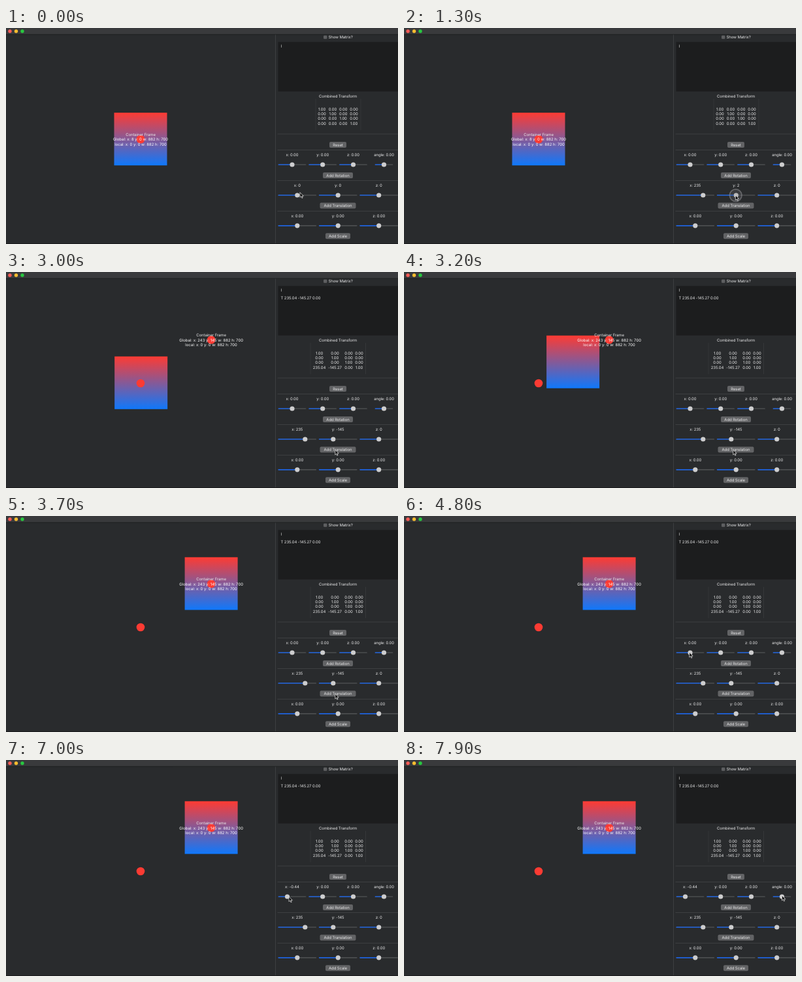
Recreate the animation shown at these times as an HTML page. Size 600x332 px, loop 8 s.

```html
<!DOCTYPE html>
<html lang="en">
<head>
<meta charset="utf-8">
<title>Transform playground</title>
<style>
  html, body { margin: 0; width: 100%; height: 100%; overflow: hidden; background: #292b2d; }
  svg { display: block; width: 600px; height: 332px; }
  text {
    font: 6px Inter, Roboto, "Liberation Sans", sans-serif;
    letter-spacing: -.1px;
    fill: #e9e9ea;
    text-anchor: middle;
    text-rendering: geometricPrecision;
    white-space: pre;
  }
  .left { text-anchor: start; }
  .wide { letter-spacing: -.02px; fill: #fff; }
  .rule { stroke: #3d3f41; stroke-width: 1; }
  .track { stroke: #4b4d4f; stroke-width: 1.7; stroke-linecap: round; }
  .fill { stroke: #1c60dc; stroke-width: 1.7; stroke-linecap: round; }
  .knob { fill: #cdcdce; }
  .button { fill: #626365; }
  .dot { fill: #fc3b33; }
</style>
</head>
<body>
<svg id="stage" viewBox="0 0 600 332">
  <defs>
    <linearGradient id="sky" x1="0" y1="0" x2="0" y2="1">
      <stop offset="0" stop-color="#fd3b33"/>
      <stop offset="1" stop-color="#0f78fb"/>
    </linearGradient>
  </defs>
  <rect width="600" height="332" fill="#292b2d"/>
  <rect width="600" height="10" fill="#393a3c"/>
  <rect y="9.5" width="600" height="1" fill="#1d1e1f"/>
  <rect y="331" width="600" height="1" fill="#1b1c1d"/>
  <circle cx="6" cy="5" r="2.7" fill="#fc5b56"/>
  <circle cx="15.5" cy="5" r="2.7" fill="#fdbd2f"/>
  <circle cx="25" cy="5" r="2.7" fill="#28c840"/>
  <path class="rule" d="M412.5 10.5V331"/>

  <rect id="square" x="165.5" y="130.2" width="81" height="81" fill="url(#sky)"/>
  <circle class="dot" cx="206" cy="171" r="6.3"/>
  <g id="label">
    <circle class="dot" cx="206" cy="171" r="6.3"/>
    <text x="206" y="166">Container Frame</text>
    <text id="global" class="wide" x="206" y="173.4"></text>
    <text class="wide" x="206" y="180.7">local: x: 0 y: 0 w: 882 h: 700</text>
  </g>

  <rect x="486" y="11.4" width="5.4" height="5.4" rx="1.2" fill="#5e5f61"/>
  <text class="left" x="493.5" y="16.3">Show Matrix?</text>
  <rect x="416.5" y="21.5" width="183.5" height="76" fill="#1c1d1e"/>
  <text class="left" x="420.5" y="29.7">I</text>
  <text id="step" class="left" x="420.5" y="41.7">T 235.04 -145.27 0.00</text>
  <text x="508" y="106.6">Combined Transform</text>
  <g id="panel"></g>

  <circle id="ring" r="9.3" fill="#77787a" fill-opacity=".22" stroke="#9a9a9e" stroke-opacity=".5" stroke-width="1.7"/>
  <path id="cursor" d="M0 0V7.6L1.8 6L3 8.8L4.2 8.3L3 5.6H5.4Z" fill="#0a0a0a" stroke="#f4f4f4" stroke-width=".7" stroke-linejoin="round"/>
</svg>
<script>
const LOOP = 8000;
const SCALE = 0.46;
const MOVE = { x: 235.04, y: -145.27 };
const APPLY = 2980, GLIDE = 450;

const $ = id => document.getElementById(id);
const panel = $('panel');

function add(parent, tag, attrs, text) {
  const el = document.createElementNS('http://www.w3.org/2000/svg', tag);
  for (const key in attrs) el.setAttribute(key, attrs[key]);
  if (text !== undefined) el.textContent = text;
  parent.append(el);
  return el;
}

const ease = u => u * u * (3 - 2 * u);

// Eased value along keys of [time, value]
function along(keys, t) {
  const next = keys.findIndex(k => k[0] > t);
  if (next === 0) return keys[0][1];
  if (next < 0) return keys[keys.length - 1][1];
  const [t0, a] = keys[next - 1], [t1, b] = keys[next];
  return a + (b - a) * ease((t - t0) / (t1 - t0));
}

for (const y of [163, 187.5, 234.5, 281.5]) {
  add(panel, 'path', { class: 'rule', d: `M415.5 ${y}H600` });
}

function button(label, y, width) {
  add(panel, 'rect', { class: 'button', x: 508 - width / 2, y: y - 4.5, width, height: 9, rx: 2 });
  add(panel, 'text', { x: 508, y: y + 2.1 }, label);
}
button('Reset', 179.5, 26);
button('Add Rotation', 226.5, 46);
button('Add Translation', 273, 55);
button('Add Scale', 319.7, 38);

function slider(name, x, y, half, perUnit, digits) {
  add(panel, 'path', { class: 'track', d: `M${x - half} ${y}H${x + half}` });
  const fill = add(panel, 'path', { class: 'fill' });
  const knob = add(panel, 'circle', { class: 'knob', cy: y, r: 3.6 });
  const label = add(panel, 'text', { x, y: y - 12.9 });
  const set = value => {
    const at = x + value * perUnit;
    const shown = value.toFixed(digits).replace(/^-(0(\.0+)?)$/, '$1');
    fill.setAttribute('d', `M${x - half} ${y}H${at}`);
    knob.setAttribute('cx', at);
    label.textContent = `${name}: ${shown}`;
  };
  set(0);
  return set;
}

const setRotX = slider('x', 438, 210, 20.5, 17, 2);
slider('y', 484.7, 210, 20.5, 17, 2);
slider('z', 531.5, 210, 20.5, 17, 2);
slider('angle', 578.5, 210, 13, 1, 2);
const setMoveX = slider('x', 445.8, 257, 28.5, 0.051, 0);
const setMoveY = slider('y', 508.2, 257, 28.5, 0.051, 0);
slider('z', 570.7, 257, 28.5, 0.051, 0);
['x', 'y', 'z'].forEach((n, i) => slider(n, 445.8 + i * 62.45, 303.8, 28.5, 1, 2));

function matrix(columns, lastRow, left, right) {
  const g = add(panel, 'g', {});
  for (let row = 0; row < 4; row++) {
    columns.forEach((x, col) => {
      const value = row === 3 ? lastRow[col] : +(row === col);
      add(g, 'text', { x, y: 126.8 + row * 7.33 }, value.toFixed(2));
    });
  }
  for (const x of [left, right]) add(g, 'path', { class: 'rule', d: `M${x} 109V157`, opacity: .6 });
  return g;
}
const identity = matrix([483.5, 500, 516.2, 532.5], [0, 0, 0, 1], 474, 543);
const moved = matrix([479.5, 503.5, 524.5, 540.5], [MOVE.x, MOVE.y, 0, 1], 466, 550.5);

const moveX = [[300, 0], [850, MOVE.x]];
const moveY = [[1220, 0], [1300, 2], [1350, 2], [1950, MOVE.y]];
const rotX = [[5550, 0], [6100, -0.26], [6700, -0.44]];

const cursorX = [[0, 450], [220, 448], [300, 448], [850, 460], [930, 460], [1180, 507.3],
  [1350, 507.3], [1950, 500], [2100, 500], [2550, 503.8], [3800, 503.8], [4450, 436.8],
  [4900, 436.8], [5400, 440.5], [5550, 440.5], [6100, 436], [6700, 433], [7250, 433], [7750, 578.5]];
const cursorY = [[0, 252.7], [220, 256.5], [930, 257], [2100, 257], [2550, 273.3],
  [3800, 273.3], [4450, 209.3], [5400, 210], [7250, 210], [7750, 208.3]];
const presses = [[250, 920], [1210, 2000], [2840, 2970], [5480, 6900]];

const show = (el, on) => el.setAttribute('visibility', on ? 'visible' : 'hidden');
const shift = (el, x, y) => el.setAttribute('transform', `translate(${x} ${y})`);

function draw(t) {
  setMoveX(along(moveX, t));
  setMoveY(along(moveY, t));
  setRotX(along(rotX, t));

  const applied = t >= APPLY;
  show(identity, !applied);
  show(moved, applied);
  show($('step'), applied);
  const [dx, dy] = [MOVE.x * SCALE, MOVE.y * SCALE];
  shift($('label'), applied ? dx : 0, applied ? dy : 0);
  $('global').textContent = `Global: x: ${applied ? 243 : 8} y: ${applied ? 145 : 0} w: 882 h: 700`;
  const u = ease(Math.min(1, Math.max(0, (t - APPLY) / GLIDE)));
  shift($('square'), dx * u, dy * u);

  const x = along(cursorX, t), y = along(cursorY, t);
  shift($('cursor'), x, y);
  shift($('ring'), x + .4, y + .2);
  show($('ring'), presses.some(([from, to]) => t >= from && t < to));
}

const start = performance.now();
function tick() {
  draw((performance.now() - start) % LOOP);
  requestAnimationFrame(tick);
}
tick();
</script>
</body>
</html>
```
